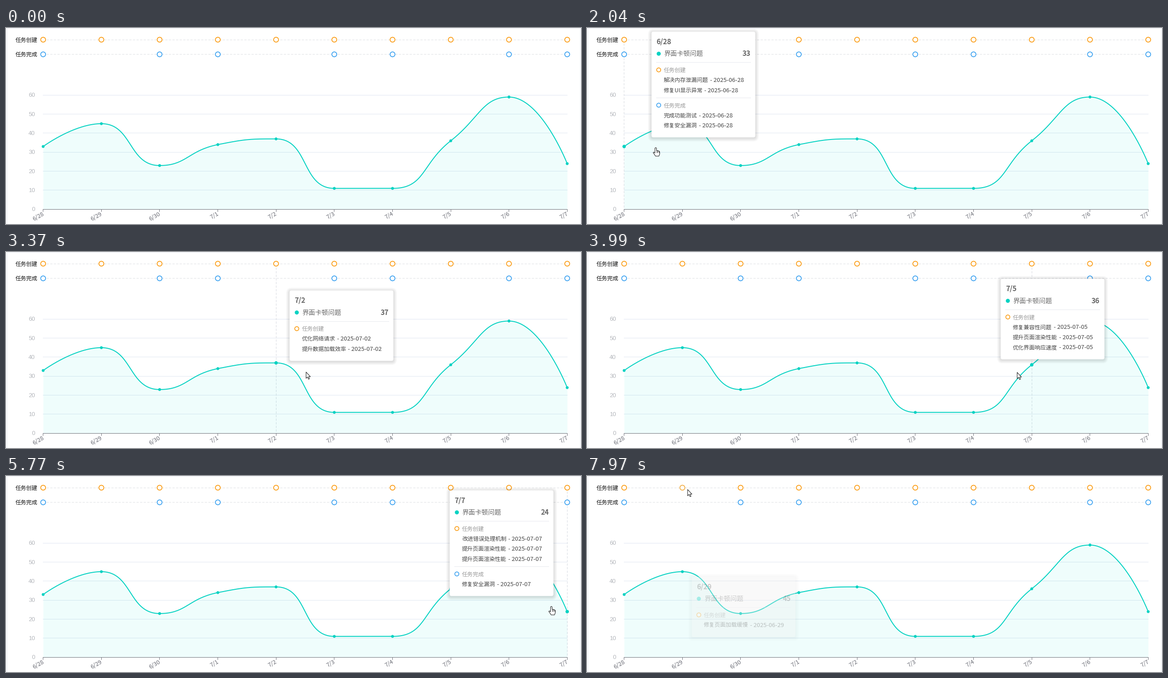
Animation, 1280 px wide and 436 px high, one loop 8000 ms. Source, as a matplotlib script:

```python
import math

import numpy as np
import matplotlib.pyplot as plt
from matplotlib.animation import FuncAnimation
from matplotlib.patches import Circle, FancyBboxPatch, Polygon

W, H, DPI = 1280, 436, 100
PT = 72 / DPI                      # points per pixel
LOOP, STEP = 8000, 50
CJK, ARIAL = "Noto Sans CJK JP", "Liberation Sans"
TEAL, ORANGE, BLUE = "#04d2c2", "#fb9a0e", "#369ff0"
AREA = "#00e0d0"
CREATED, DONE = "任务创建", "任务完成"

DAYS = ["6/28", "6/29", "6/30", "7/1", "7/2", "7/3", "7/4", "7/5", "7/6", "7/7"]
VALUES = [33, 45, 23, 34, 37, 11, 11, 36, 59, 24]
TASKS = [
    (["解决内存泄漏问题", "修复UI显示异常"], ["完成功能测试", "修复安全漏洞"]),
    (["修复页面加载缓慢"], []),
    (["优化网络请求"], ["修复安全漏洞"]),
    (["修复兼容性问题"], ["完成功能测试"]),
    (["优化网络请求", "提升数据加载效率"], []),
    (["改进错误处理机制"], ["修复页面加载缓慢"]),
    (["优化界面响应速度"], ["完成功能测试"]),
    (["修复兼容性问题", "提升页面渲染性能", "优化界面响应速度"], []),
    (["修复UI显示异常"], ["优化网络请求"]),
    (["改进错误处理机制", "提升页面渲染性能", "提升页面渲染性能"], ["修复安全漏洞"]),
]

LEFT, RIGHT, TOP, BASE = 82.7, 1249.3, 149.3, 403.3
ROW_Y = {CREATED: 26, DONE: 58.6}
XS = np.linspace(LEFT, RIGHT, len(DAYS))
YS = BASE - np.array(VALUES) * (BASE - TOP) / 60

# Pointer path: time, x, y
PATH = np.array([
    (460, 850, 430), (560, 835, 345), (1175, 357, 226), (1425, 125, 205),
    (1505, 95, 212), (1650, 86, 235), (1835, 92, 263), (2025, 153, 266),
    (3050, 508, 268), (3375, 668, 267), (4150, 1042, 268), (4620, 1049, 268),
    (5400, 1249, 284), (5705, 1249, 286), (5775, 1214, 290), (6900, 8, 245),
    (7050, 40, 238), (7300, 213, 215), (7830, 213, 215), (7900, 220, 90),
    (7975, 224, 30),
])
TIP_W, GAP = 231, 20
LAG, FADE, DAY_DELAY = 120, 160, 50


def smooth_curve(xs, ys, smooth=0.5, n=40):
    """Bezier spline whose handles never leave their segment's box."""
    pts = np.column_stack([xs, ys])
    handle = pts[0]
    u = np.linspace(0, 1, n)[:, None]
    out = []
    for i in range(1, len(pts)):
        prev, cur = pts[i - 1], pts[i]
        h_in, h_out = cur, cur
        if i < len(pts) - 1:
            nxt = pts[i + 1]
            d0, d1 = math.dist(prev, cur), math.dist(cur, nxt)
            h_out = cur + (nxt - prev) * smooth * d1 / (d0 + d1)
            h_out = np.clip(h_out, np.minimum(cur, nxt), np.maximum(cur, nxt))
            h_in = cur - (h_out - cur) * d0 / d1
            h_in = np.clip(h_in, np.minimum(prev, cur), np.maximum(prev, cur))
            h_out = cur + (cur - h_in) * d1 / d0
        out.append((1 - u) ** 3 * prev + 3 * u * (1 - u) ** 2 * handle
                   + 3 * u * u * (1 - u) * h_in + u ** 3 * cur)
        handle = h_out
    return np.vstack(out).T


def layout(day):
    """Sections of a tooltip as (divider y, name, colour, items), and its height."""
    y, sections = 68, []
    for name, color, items in zip((CREATED, DONE), (ORANGE, BLUE), TASKS[day]):
        if items:
            rows = [(y + 39 + 22.5 * k, item) for k, item in enumerate(items)]
            sections.append((y, name, color, rows))
            y = rows[-1][0] + 17
    return sections, y + 10


LAYOUTS = [layout(d) for d in range(len(DAYS))]


def pointer(t):
    return np.interp(t, PATH[:, 0], PATH[:, 1]), np.interp(t, PATH[:, 0], PATH[:, 2])


def in_grid(x, y):
    return LEFT - 1 <= x <= RIGHT + 1 and TOP <= y <= BASE


def tip_target(x, y, height):
    tx = x + GAP if x + GAP + TIP_W <= W else x - GAP - TIP_W
    ty = y + GAP if y + GAP + height <= H else y - GAP - height
    return np.array([tx, ty])


def simulate(dt=5):
    """The tooltip trails the pointer; returns one state per drawn frame."""
    states, pos, alpha, day = [], np.zeros(2), 0.0, 0
    for t in range(0, LOOP, dt):
        x, y = pointer(t)
        hover = t >= PATH[0, 0] and in_grid(x, y)
        if hover:
            day = int(np.abs(XS - pointer(t - DAY_DELAY)[0]).argmin())
            goal = tip_target(x, y, LAYOUTS[day][1])
            pos = goal if alpha == 0 else pos + (goal - pos) * (1 - math.exp(-dt / LAG))
        alpha = min(1, max(0, alpha + (dt if hover else -dt) / FADE))
        if t % STEP == STEP // 2:
            states.append((t, x, y, hover, day, pos, alpha))
    return states


fig = plt.figure(figsize=(W / DPI, H / DPI), dpi=DPI, facecolor="white")
ax = fig.add_axes([0, 0, 1, 1])
ax.set_xlim(0, W)
ax.set_ylim(H, 0)
ax.axis("off")


def line(xs, ys, color, width=1, z=1, **kw):
    return ax.plot(xs, ys, color=color, lw=width * PT, zorder=z, **kw)[0]


def rule(xs, ys, color, z=1, **kw):
    """Crisp straight line; whole coordinates snap onto their own pixel."""
    return line(np.floor(xs), np.floor(ys), color, z=z, **kw)


def dashed(xs, ys, color, z=1):
    return rule(xs, ys, color, z, ls=(0, (5, 3)))


def circle(x, y, r, face, edge="none", width=0, z=3, alpha=1):
    return ax.add_patch(Circle((x, y), r, fc=face, ec=edge, lw=width * PT,
                               zorder=z, alpha=alpha))


def label(x, y, s, size, color, font=CJK, z=3, **kw):
    """Text whose digits or ideographs are centred on y."""
    return ax.text(x, y + 0.37 * size, s, fontsize=size * PT, color=color,
                   family=font, va="baseline", zorder=z, **kw)


CURVE_X, CURVE_Y = smooth_curve(XS, YS)


def draw_chart():
    rule([2, 2, 1278, 1278], [H, 0, 0, H], "#e9ecf4")
    for v in range(0, 61, 10):
        y = BASE - v * (BASE - TOP) / 60
        if v:
            rule([LEFT, RIGHT], [y, y], "#e0e6f1")
        label(64.5, y - 0.8, str(v), 13, "#b3b6bb", ARIAL, ha="right")
    ax.fill_between(CURVE_X, CURVE_Y, BASE, color=AREA, alpha=0.061, lw=0, zorder=2)
    rule([LEFT, RIGHT], [BASE, BASE], "#6e7079", z=2.2)
    line(CURVE_X, CURVE_Y, TEAL, 2, 2.5)
    for i, (x, y) in enumerate(zip(XS, YS)):
        rule([x, x], [BASE, BASE + 5], "#6e7079", z=2.2)
        circle(x, y, 3.2, TEAL)
        ax.text(x + 2.4, 416, DAYS[i], fontsize=13 * PT, color="#6e7079", family=CJK,
                rotation=30, rotation_mode="anchor", ha="right", va="baseline")
    for k, (name, color) in enumerate(((CREATED, ORANGE), (DONE, BLUE))):
        y = ROW_Y[name]
        dashed([LEFT, RIGHT], [y, y], "#dcdee2")
        label(21, y, name, 12.4, "#111111")
        for i, x in enumerate(XS):
            if TASKS[i][k]:
                circle(x, y, 5.4, "white", color, 1.7)


def draw_tip(x, y, day, a):
    sections, height = LAYOUTS[day]
    parts = []

    def box(grow, color, alpha, z, dy=0.0):
        parts.append(ax.add_patch(FancyBboxPatch(
            (x - grow, y - grow + dy), TIP_W + 2 * grow, height + 2 * grow,
            boxstyle=f"round,pad=0,rounding_size={4 + grow}",
            fc=color, ec="none", alpha=alpha, zorder=z)))

    def put(dx, dy, s, size, color, **kw):
        parts.append(label(x + dx, y + dy, s, size, color, z=6, alpha=a, **kw))

    for g in range(1, 9):
        box(g, "black", 0.015 * a, 5, 1.5)
    box(0, "white", a, 5.5)
    put(11, 21.5, DAYS[day], 15.5, "#666666", weight="bold")
    parts.append(circle(x + 16, y + 49, 4.5, TEAL, z=6, alpha=a))
    put(28, 48.5, "界面卡顿问题", 14.5, "#6a6a6a")
    put(220.5, 48.5, str(VALUES[day]), 15.5, "#666666", weight="bold", ha="right")
    month, date = DAYS[day].split("/")
    stamp = f" - 2025-{int(month):02d}-{int(date):02d}"
    for sep, name, color, rows in sections:
        parts.append(rule([x + 11, x + 221], [y + sep + 0.5] * 2, "#e6e8ee", z=6, alpha=a))
        parts.append(circle(x + 16, y + sep + 17, 4.5, "white", color, 1.6, 6, a))
        put(27, sep + 17, name, 12.4, "#9a9a9a")
        for dy, item in rows:
            width = 12.4 * sum(0.5 if c.isascii() else 1 for c in item)
            put(27, dy, item, 12.4, "#454545")
            put(28 + width, dy, stamp, 13.2, "#454545")
    return parts


ARROW = [(0, 0), (0, 14), (3.2, 11), (5.4, 16), (7.6, 15), (5.5, 10.4), (9.6, 10.4)]
HAND = [(-1.7, 12), (-1.7, 1.2), (0, 0), (1.7, 1.2), (1.7, 6.3), (4.3, 6.8), (6.8, 7.8),
        (8.8, 9.3), (8.8, 14), (7, 19), (-0.5, 19), (-3, 15), (-5.7, 11.3), (-4.4, 10)]


def draw_pointer(x, y):
    hand = LEFT <= x <= RIGHT and np.interp(x, CURVE_X, CURVE_Y) < y < BASE
    shape = np.array(HAND if hand else ARROW) + (x, y)
    parts = [ax.add_patch(Polygon(shape, fc="white", ec="#222222", lw=1.1 * PT,
                                  joinstyle="round", zorder=8))]
    if hand:
        for dx in (1.8, 4.2, 6.6):
            parts.append(line([x + dx, x + dx], [y + 7, y + 10.5], "#222222", 0.9, 8))
    return parts


draw_chart()
STATES = simulate()
live = []


def update(i):
    while live:
        live.pop().remove()
    t, x, y, hover, day, pos, alpha = STATES[i]
    if hover:
        live.append(dashed([XS[day]] * 2, [ROW_Y[CREATED], BASE], "#d5d8df", 1.5))
        live.append(circle(XS[day], YS[day], 3.8, TEAL))
    if alpha > 0:
        live.extend(draw_tip(*pos, day, alpha))
    if t >= PATH[0, 0]:
        near = int(np.abs(XS - x).argmin())
        if math.dist((x, y), (XS[near], ROW_Y[CREATED])) < 15:
            live.append(circle(XS[near], ROW_Y[CREATED], 5.4, "white", "#f3b555", 1.7, 4))
        live.extend(draw_pointer(x, y))
    return live


anim = FuncAnimation(fig, update, frames=LOOP // STEP, interval=STEP,
                     init_func=lambda: [], repeat=True, repeat_delay=0, blit=False)
plt.show()
```
